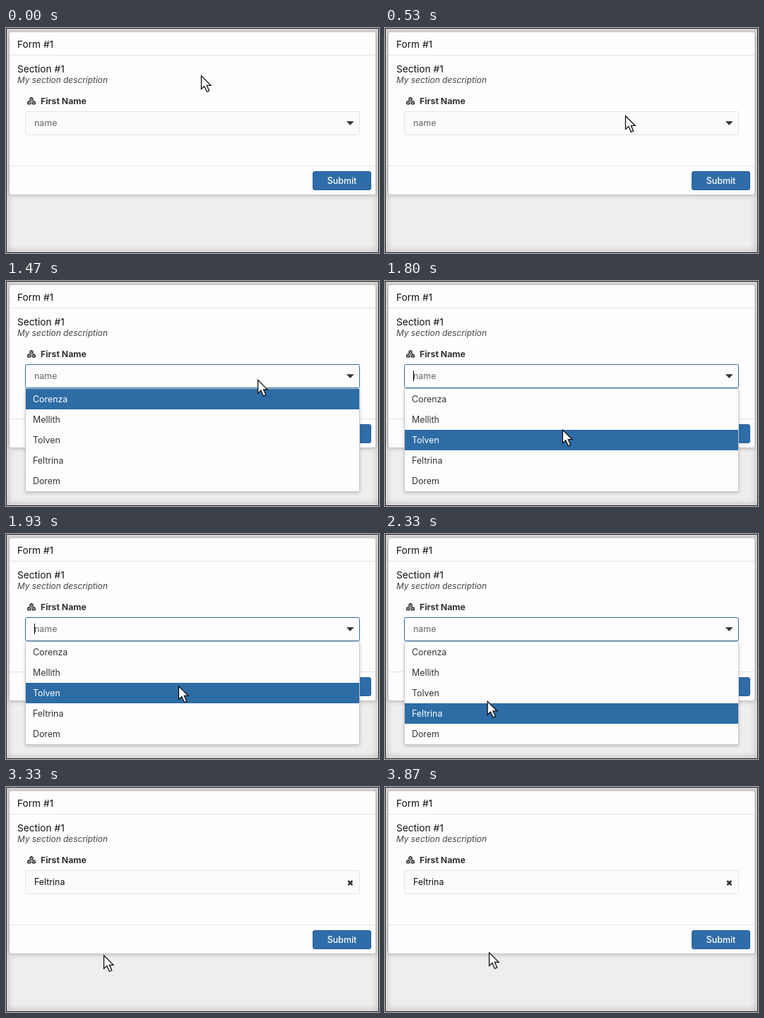
Write an HTML page that moves like this. It is 528 px wide and 319 px high and loops after 4190 ms.

```html
<!DOCTYPE html>
<html lang="en">
<head>
<meta charset="utf-8">
<title>Form demo</title>
<style>
  html, body { margin: 0; width: 100%; height: 100%; overflow: hidden; background: #efedee; }
  svg { display: block; width: 528px; height: 319px; }
  text { font: 12.4px Inter, "Open Sans", sans-serif; fill: #333; }
  .title { font-size: 13.7px; fill: #111; }
  .note { font-size: 11.9px; font-style: italic; fill: #444; }
  .label { font-size: 12.3px; font-weight: 700; }
  .hint { fill: #666; }
  .btn { font-weight: 500; fill: #fff; }
  .card { filter: drop-shadow(0 1px 3px rgba(0, 0, 0, .28)); }
  .menu { filter: drop-shadow(0 2px 2px rgba(0, 0, 0, .18)); }
  .rule { stroke: #e1e0e4; }
</style>
</head>
<body>
<svg viewBox="0 0 528 319">
  <defs>
    <filter id="soft" x="-10%" y="-10%" width="120%" height="120%"><feGaussianBlur stdDeviation="4"/></filter>
    <path id="cube" d="M0-3.2L2.8-1.8V1.6L0 3.1L-2.8 1.6V-1.8Z"/>
    <path id="seam" d="M-2.2-1.1L0 0L2.2-1.1M0 0V2.4" fill="none" stroke="#fff" stroke-width=".7"/>
  </defs>
  <rect width="528" height="319" fill="#efedee"/>
  <rect width="528" height="319" fill="none" stroke="#000" stroke-opacity=".22" stroke-width="6" filter="url(#soft)"/>
  <rect class="card" x="5" y="6" width="518" height="230" rx="3" fill="#fefdfe"/>
  <path class="rule" d="M5 38.5H523M5 195.5H523"/>
  <text class="title" x="16" y="28">Form #1</text>
  <text class="title" x="16" y="63">Section #1</text>
  <text class="note" x="16" y="78">My section description</text>
  <g id="cubes" fill="#333"></g>
  <text class="label" x="49" y="108">First Name</text>

  <rect x="27.5" y="118.5" width="473" height="33" rx="2" fill="#fbfafc" stroke="#e4e3e7"/>
  <rect id="focus" x="27.5" y="118.5" width="473" height="33" rx="2" fill="#fefdfe" stroke="#2d6ca5"/>
  <text id="value" x="40" y="139"></text>
  <path id="caret" d="M40.5 127V142" stroke="#000"/>
  <path id="arrow" d="M482.5 132.5H492L487.2 137.5Z" fill="#333" stroke="#333" stroke-width=".6" stroke-linejoin="round"/>
  <path id="clear" d="M484.3 133L490.3 139M490.3 133L484.3 139" stroke="#333" stroke-width="2.5"/>

  <rect x="434.5" y="203.5" width="82" height="26" rx="2.5" fill="#2f6da8" stroke="#28629a"/>
  <text class="btn" x="475.5" y="221" text-anchor="middle">Submit</text>

  <g id="menu" class="menu">
    <rect x="27.5" y="152.5" width="473" height="146" rx="1.5" fill="#fefdfe" stroke="#c9c8cb"/>
    <rect id="bar" x="28" width="472" height="29" fill="#2d6ca5"/>
    <g id="items"></g>
  </g>
  <path id="cursor" d="M.5.8V19.6L4.8 15.6L8.3 23.5L11.7 22L8.3 14.4H14Z" fill="#fff" stroke="#111" stroke-width="1.3"/>
  <rect x=".5" y=".5" width="527" height="318" fill="none" stroke="#222"/>
</svg>
<script>
const LOOP = 4190, STEP = 200 / 3;
const ROW = 29, TOP = 153, BLINK = 467;
const names = ["Corenza", "Mellith", "Tolven", "Feltrina", "Dorem"];
const PICK = 3;
// start, end, target x, target y
const moves = [
  [200, 733, 357, 139],
  [1400, 1933, 244, 215],
  [1933, 2467, 138, 238],
  [3267, 3867, 147, 234]
];

const $ = id => document.getElementById(id);
const svgNode = (tag, attrs, parent) => {
  const el = document.createElementNS("http://www.w3.org/2000/svg", tag);
  for (const k in attrs) el.setAttribute(k, attrs[k]);
  return parent.appendChild(el);
};
const clamp = v => Math.min(1, Math.max(0, v));
const ramp = (t, a, b) => clamp((t - a) / (b - a));
const ease = p => p < .5 ? 4 * p ** 3 : 1 - 4 * (1 - p) ** 3;
const show = (id, on) => $(id).setAttribute("opacity", +on);

for (const [x, y] of [[36, 101], [32.7, 106.2], [39.3, 106.2]])
  for (const ref of ["cube", "seam"])
    svgNode("use", { href: "#" + ref, x, y }, $("cubes"));

const items = names.map((name, i) => {
  const el = svgNode("text", { x: 38, y: TOP + 19 + ROW * i }, $("items"));
  el.textContent = name;
  return el;
});

function pointer(t) {
  let x = 276, y = 67;
  for (const [a, b, tx, ty] of moves) {
    const p = ease(ramp(t, a, b));
    x += (tx - x) * p;
    y += (ty - y) * p;
  }
  return [x, y];
}

function draw(time) {
  const t = Math.floor((time + 4) / STEP) * STEP + .1;
  const [x, y] = pointer(t);
  $("cursor").setAttribute("transform", `translate(${x.toFixed(2)} ${y.toFixed(2)})`);

  const done = t >= 3000;
  const fade = ramp(t, 733, 1000);
  show("menu", done ? 0 : fade);
  show("focus", fade * (1 - ramp(t, 2800, 2933)));
  show("caret", t > 799 && t < 2866 && Math.floor((t - 803) / BLINK) % 2 < 1);
  show("arrow", !done);
  show("clear", done);

  const value = $("value");
  value.textContent = done ? names[PICK] : "name";
  value.style.fill = done ? "#111" : "#666";

  const row = done ? PICK : Math.max(0, Math.floor((y + 4 - TOP) / ROW));
  $("bar").setAttribute("y", TOP + ROW * Math.min(row, names.length - 1));
  items.forEach((el, i) => el.style.fill = i === row ? "#fff" : "#333");
}

const start = performance.now();
function tick() {
  draw((performance.now() - start) % LOOP);
  requestAnimationFrame(tick);
}
tick();
</script>
</body>
</html>
```
